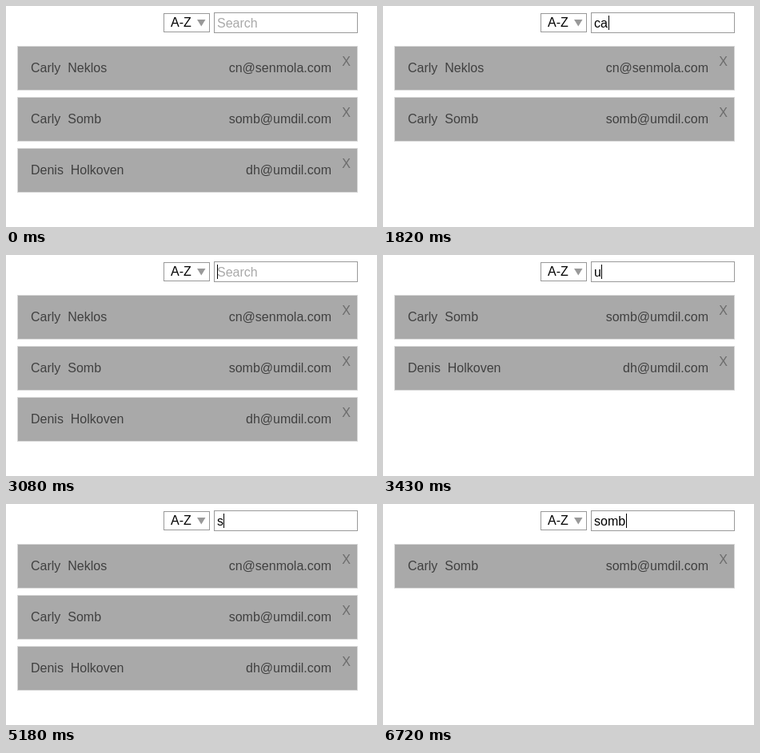
An HTML page that plays this animation: 464x277 px, repeating every 7.28 s.

```html
<!DOCTYPE html>
<html lang="en">
<head>
<meta charset="utf-8">
<title>Contact search</title>
<style>
  html, body { margin: 0; width: 100%; height: 100%; overflow: hidden; background: #fff; }
  svg { display: block; width: 464px; height: 277px; }
  text { font: 16px "Liberation Sans", Arial, sans-serif; white-space: pre; }
  .box { fill: #fff; stroke: #999; }
  .card { fill: #a9a9a9; stroke: #d8d8d8; }
  .info { fill: #404040; }
  .close { fill: #6c6c6c; }
  .hint { fill: #a9a9a9; }
  .end { text-anchor: end; }
  .mid { text-anchor: middle; }
</style>
</head>
<body>
<svg viewBox="0 0 464 277">
  <rect class="box" x="197.5" y="9.5" width="57" height="23"/>
  <text x="206" y="26">A-Z</text>
  <path d="M239 17H249.500L244.250 25.500Z" fill="#999"/>
  <rect class="box" x="260.500" y="8.500" width="179" height="25"/>
  <text id="query" x="264" y="27"></text>
  <rect id="caret" y="12" width="1" height="18"/>
  <g id="list"></g>
</svg>
<script>
const LOOP = 7280;
const ROW_STEP = 64;

const contacts = [
  ["Carly", "Neklos", "cn@senmola.com"],
  ["Carly", "Somb", "somb@umdil.com"],
  ["Denis", "Holkoven", "dh@umdil.com"]
];

// start time, typed text, caret x (0 = hidden)
const steps = [
  [0, "", 0], [1260, "", 264],
  [1610, "c", 272], [1820, "ca", 282], [1890, "car", 287],
  [2030, "carl", 291], [2170, "carly", 299], [2450, "carl", 291],
  [2590, "car", 287], [2730, "ca", 282], [2940, "c", 272],
  [3080, "", 264],
  [3430, "u", 273], [3640, "um", 287], [3850, "umd", 296],
  [3920, "umdi", 300], [3990, "umdil", 303], [4270, "umdi", 300],
  [4410, "umd", 296], [4620, "um", 287], [4830, "u", 273],
  [4970, "", 264],
  [5180, "s", 272], [5320, "so", 281], [5600, "som", 295],
  [5670, "somb", 304], [6230, "somb", 0], [6720, "somb", 304]
];

const byId = id => document.getElementById(id);
const query = byId("query");
const caret = byId("caret");
const list = byId("list");

function add(parent, tag, attrs, label = "") {
  const el = document.createElementNS("http://www.w3.org/2000/svg", tag);
  for (const key in attrs) el.setAttribute(key, attrs[key]);
  el.textContent = label;
  return parent.appendChild(el);
}

const rows = contacts.map(([first, last, mail]) => {
  const g = add(list, "g", {});
  add(g, "rect", { class: "card", x: 14.5, y: 50.5, width: 425, height: 55 });
  add(g, "text", { class: "info", x: 31, y: 83 }, `${first}  ${last}`);
  add(g, "text", { class: "info end", x: 407, y: 83 }, mail);
  add(g, "text", { class: "close mid", x: 425.7, y: 75 }, "X");
  return { g, key: `${first} ${last} ${mail}`.toLowerCase() };
});

function render(time) {
  const [, typed, x] = steps.findLast(step => step[0] <= time);
  query.textContent = typed || "Search";
  query.setAttribute("class", typed ? "" : "hint");
  caret.setAttribute("x", x);
  caret.setAttribute("visibility", x ? "visible" : "hidden");
  let shown = 0;
  for (const { g, key } of rows) {
    const match = key.includes(typed);
    g.setAttribute("display", match ? "inline" : "none");
    if (match) g.setAttribute("transform", `translate(0 ${ROW_STEP * shown++})`);
  }
}

const start = performance.now();
function tick() {
  render((performance.now() - start) % LOOP);
  requestAnimationFrame(tick);
}
tick();
</script>
</body>
</html>
```
